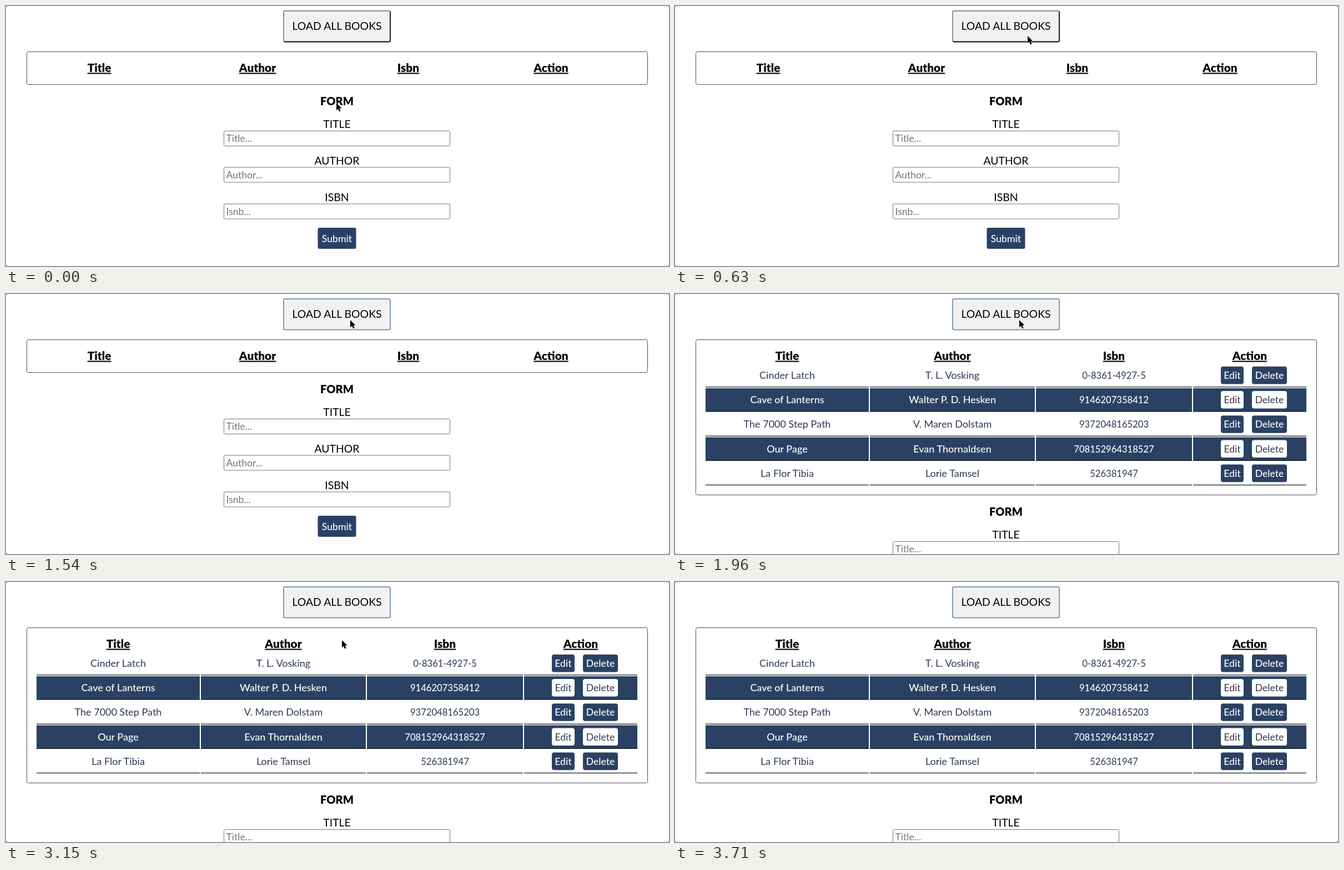
These frames come from a looping animation (1194x469 px, 3.78 s). An HTML page:

```html
<!DOCTYPE html>
<html lang="en">
<head>
<meta charset="utf-8">
<title>Book list</title>
<style>
  html, body { margin: 0; width: 100%; height: 100%; overflow: hidden; background: #8a8a8a; }
  svg { display: block; width: 100%; height: 100%; font: 18px Lato, "Open Sans", sans-serif; }
  text { text-anchor: middle; }
  .caps { font-size: 19.4px; }
  .head { font-size: 20.8px; font-weight: 900; text-decoration: underline; text-decoration-thickness: 2px; text-underline-offset: 2px; }
  .form-title { font-size: 20px; font-weight: 900; }
  .hint { font-size: 17.5px; fill: #757575; text-anchor: start; }
  .field { fill: #fff; stroke: #767676; }
  .isbn { font-size: 16.6px; }
  .small { font-size: 17.6px; }
  .navy { fill: #2a4164; }
  .white { fill: #fff; }
  .ink { fill: #2b3a52; }
  .strong { font-weight: 500; }
  .frame { fill: none; stroke: #4d4d55; }

  .before, .after, .plain, .focus, .form, .cursor, .arrow, .beam { animation: 3780ms step-end infinite; }
  .before { animation-name: until-load; }
  .after { animation-name: from-load; }
  .form { animation-name: push-down; }
  .plain { animation-name: until-press; }
  .focus { animation-name: from-press; }
  .cursor { animation-name: travel; }
  .arrow { animation-name: arrow; }
  .beam { animation-name: beam; }

  @keyframes until-load { 0% { visibility: visible } 51.851%, 100% { visibility: hidden } }
  @keyframes from-load { 0% { visibility: hidden } 51.851%, 100% { visibility: visible } }
  @keyframes push-down { 0% { transform: none } 51.851%, 100% { transform: translateY(221px) } }
  @keyframes until-press { 0% { visibility: visible } 37.037%, 100% { visibility: hidden } }
  @keyframes from-press { 0% { visibility: hidden } 37.037%, 100% { visibility: visible } }
  @keyframes arrow { 0% { visibility: visible } 25.925% { visibility: hidden } 38.888%, 100% { visibility: visible } }
  @keyframes beam { 0% { visibility: hidden } 25.925% { visibility: visible } 38.888%, 100% { visibility: hidden } }
  @keyframes travel {
    0% { transform: translate(595px, 175px) }
    1.851% { transform: translate(600px, 104px) }
    7.407% { transform: translate(600px, 104px); animation-timing-function: steps(5) }
    16.666% { transform: translate(635px, 54px); animation-timing-function: steps(3) }
    22.222% { transform: translate(620px, 47px) }
    83.333% { transform: translate(605px, 105px); animation-timing-function: steps(7) }
    96.296%, 100% { transform: translate(598px, 490px) }
  }
</style>
</head>
<body>
<svg viewBox="0 0 1194 469">
  <rect width="1194" height="469" rx="4" fill="#fff"/>

  <rect x="500" y="9" width="192" height="55.5" rx="2.5" fill="#f1f1f2"/>
  <g class="plain" fill="none">
    <rect x="500" y="8.8" width="192" height="55.8" rx="2.5" stroke="#6a6a6a" stroke-width="1.4"/>
    <path d="M501 64.5H689.5Q692 64.5 692 62V10" stroke="#111" stroke-width="1.8"/>
  </g>
  <rect class="focus" x="500" y="8.8" width="192" height="55.8" rx="2.5" fill="none" stroke="#5b7da6" stroke-width="1.5"/>
  <text class="caps" x="596" y="42.5">LOAD ALL BOOKS</text>

  <g class="before">
    <rect class="frame" x="37.5" y="82.5" width="1118" height="59" rx="3"/>
    <g id="headsBefore"></g>
  </g>
  <g class="after">
    <rect class="frame" x="37.5" y="82.5" width="1118" height="280" rx="3"/>
    <g id="headsAfter"></g>
    <g id="rows"></g>
  </g>

  <g class="form">
    <text class="form-title" x="596" y="179">FORM</text>
    <g id="fields"></g>
    <rect class="navy" x="561.5" y="400" width="69" height="38" rx="3"/>
    <text class="white small strong" x="596" y="425.7">Submit</text>
  </g>

  <g class="cursor">
    <path class="arrow" d="M0 0V13.2L3 10.5L5.2 15.4L7.6 14.3L5.4 9.5H9.6Z" fill="#000" stroke="#fff" stroke-width="1.2" paint-order="stroke"/>
    <path class="beam" d="M-3.5 -8Q0 -8 0 -5V5Q0 8 -3.5 8M3.5 -8Q0 -8 0 -5V5Q0 8 3.5 8M-2 3H2" fill="none" stroke="#222" stroke-width="1.2"/>
  </g>
</svg>
<script>
  const fill = (id, html) => { document.getElementById(id).innerHTML = html; };
  const text = (x, y, label, cls) => `<text x="${x}" y="${y}" class="${cls}">${label}</text>`;
  const rect = (x, y, w, h, cls, rx = 0) =>
    `<rect x="${x}" y="${y}" width="${w}" height="${h}" rx="${rx}" class="${cls}"/>`;

  const titles = ["Title", "Author", "Isbn", "Action"];
  const heads = centers => titles.map((t, i) => text(centers[i], 118.5, t, "head")).join("");
  const centers = [202, 499.5, 790.5, 1035];
  fill("headsBefore", heads([168, 453, 724.5, 981.5]));
  fill("headsAfter", heads(centers));

  const columns = [[55, 294], [351, 297], [650, 281], [933, 204]];
  const books = [
    ["Cinder Latch", "T. L. Vosking", "0-8361-4927-5"],
    ["Cave of Lanterns", "Walter P. D. Hesken", "9146207358412"],
    ["The 7000 Step Path", "V. Maren Dolstam", "9372048165203"],
    ["Our Page", "Evan Thornaldsen", "708152964318527"],
    ["La Flor Tibia", "Lorie Tamsel", "526381947"]
  ];

  function row(book, i) {
    const dy = 44.2 * i, dark = i % 2 === 1, base = 153 + dy;
    const cells = columns.map(([x, w]) =>
      (dark ? rect(x, 125.8 + dy, w, 42, "navy") : "") + rect(x, 167.2 + dy, w, 1.1, ""));
    const labels = book.map((label, c) =>
      text(centers[c], base, label, (dark ? "white strong" : "ink") + (c === 2 ? " isbn" : "")));
    const button = (x, w, label) =>
      rect(x, 130.8 + dy, w, 31.6, dark ? "white" : "navy", 4) +
      text(x + w / 2, base, label, "small " + (dark ? "ink" : "white strong"));
    return [...cells, ...labels, button(983, 41, "Edit"), button(1039, 63, "Delete")].join("");
  }
  fill("rows", books.map(row).join(""));

  const field = (label, hint, y) =>
    text(596, y - 5, label, "caps") + rect(392.5, y + .5, 407, 27, "field", 2) + text(396.5, y + 20.3, hint, "hint");
  fill("fields", field("TITLE", "Title...", 225) + field("AUTHOR", "Author...", 290.5) + field("ISBN", "Isnb...", 356.5));
</script>
</body>
</html>
```
